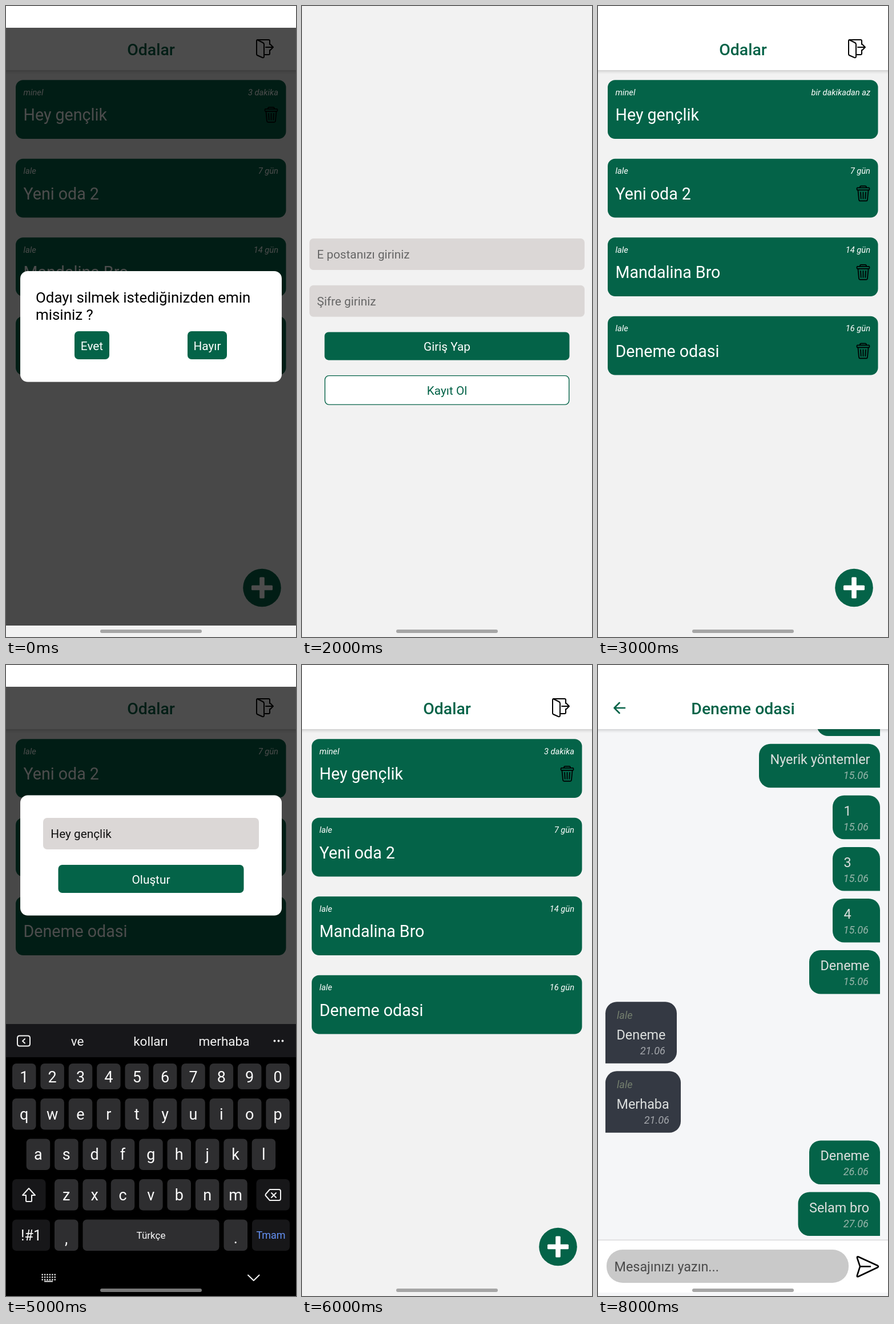
An HTML page that plays this animation: 508x1102 px, repeating every 9000 ms.

```html
<!DOCTYPE html>
<html lang="tr">
<head>
<meta charset="utf-8">
<style>
html, body { margin: 0; width: 100%; height: 100%; overflow: hidden; background: #f2f2f2; }
svg { display: block; width: 100vw; height: 100vh; font-family: Roboto, sans-serif; }
</style>
</head>
<body>
<svg id="stage" viewBox="0 0 508 1102"></svg>
<script>
const GREEN = '#046348', PAGE = '#f2f2f2', GRAY = '#dbd7d6';
const BODY = 20.8, CHAT = 23.4;

const rect = (x, y, w, h, fill, r = 0, extra = '') =>
  `<rect x="${x}" y="${y}" width="${w}" height="${h}" rx="${r}" fill="${fill}" ${extra}/>`;
const text = (x, y, size, fill, str, extra = '') =>
  `<text x="${x}" y="${y}" font-size="${size}" fill="${fill}" ${extra}>${str}</text>`;
const line = (d, color, width, extra = '') =>
  `<path d="${d}" fill="none" stroke="${color}" stroke-width="${width}" stroke-linejoin="round" stroke-linecap="round" ${extra}/>`;
const MID = 'text-anchor="middle"', END = 'text-anchor="end"', ITALIC = 'font-style="italic"';

const pill = (color = '#a6a6a6') => rect(165, 1089, 178, 6, color, 3);
const dim = (bottom = 1082) => rect(0, 38, 508, bottom - 38, 'rgba(0,0,0,.7)');

function header(title) {
  let shadow = '';
  for (let i = 0; i < 7; i++) shadow += rect(0, 112 + i, 508, 1, `rgba(0,0,0,${.13 * (1 - i / 7) ** 1.5})`);
  return shadow + rect(0, 0, 508, 112, '#fff') + text(254, 85.5, 28.4, GREEN, title, MID + ' font-weight="500"');
}

const door = line('M462 67V61q0-2-2-2H441q-2 0-2 2v23q0 1 1 2l9 4q3 1 3-2V67q0-2-2-3l-10-5M452 85h8q2 0 2-2v-6M455 72h12m-4-5l5 5-5 5', '#000', 2);

const trash = y => line(`M454.5 ${y + 4}h20q1 0 1 2t-1 2h-20q-1 0-1-2t1-2zM459 ${y + 4}v-1q0-2 2-2h7q2 0 2 2v1M455.5 ${y + 9}l1.5 16q.3 2 2 2h11q1.700 0 2-2l1.500-16M460 ${y + 12}l.7 11M464.500 ${y + 12}v11M469 ${y + 12}l-.7 11`, '#000', 1.7);

function card(i, [user, age, name, bin]) {
  const y = 129.3 + 137.5 * i;
  return rect(17, y, 473.5, 102.8, GREEN, 13)
    + text(30.5, y + 26.5, 14.7, '#fff', user, ITALIC)
    + text(477, y + 26.5, 14.7, '#fff', age, ITALIC + END.padStart(18))
    + text(30.5, y + 71, 28.6, '#fff', name)
    + (bin ? trash(y + 46.5) : '');
}

const list = cards => rect(0, 0, 508, 1102, PAGE) + header('Odalar') + door
  + cards.map((c, i) => card(i, c)).join('')
  + `<circle cx="448.5" cy="1016" r="33.3" fill="${GREEN}"/>`
  + rect(430, 1011.7, 37, 8.6, '#fff', 1.5) + rect(444.200, 997.5, 8.6, 37, '#fff', 1.5) + pill();

const field = (x, y, w, str, fill = '#666') => rect(x, y, w, 55, GRAY, 7) + text(x + 13.3, y + 35.3, BODY, fill, str);
const button = (x, y, w, str) => rect(x, y, w, 49, GREEN, 7) + text(x + w / 2, y + 33, BODY, '#fff', str, MID);
const outlined = (y, str) => rect(40.2, y + .7, 427.600, 50.5, '#fff', 7, `stroke="${GREEN}" stroke-width="1.400"`)
  + text(254, y + 33.7, BODY, GREEN, str, MID);

// Centred form: fields, main button, outlined button
function form(y, fields, main, other) {
  const end = y + 81.7 * fields.length;
  return rect(0, 0, 508, 1102, PAGE)
    + fields.map((f, i) => field(13, y + 81.7 * i, 482, f)).join('')
    + button(39.5, end, 429, main) + outlined(end + 75.5, other) + pill();
}

function banner() {
  let s = rect(0, 0, 508, 76, '#f0ad4e') + text(26.5, 48, BODY, '#fff', 'Lütfen tüm alanları doldurunuz')
    + text(28.5, 31, 19.7, '#fff', '23:40', 'font-weight="700"')
    + line('M88 20v-2q0-2 2-2h2M99 16h2q2 0 2 2v2M103 28v2q0 2-2 2h-2M92 32h-2q-2 0-2-2v-2', '#fff', 1.8)
    + rect(91, 19.500, 9.5, 9, '#fff', 2) + line('M92.500 27l2.500-3 2 2 1-1 1.500 2', '#f0ad4e', 1.2)
    + '<path d="M377 20.500h4l6-4.500v16l-6-4.500h-4z" fill="#fff"/>'
    + line('M378 16l13 15M390 18v4M390 26v2', '#fff', 1.6)
    + line('M400 21q8-7 16 0M402.500 24.500q5.500-5 11 0M405.500 28q2.500-2 5 0M414 30v-4m3 0v4', '#fff', 1.800)
    + '<circle cx="408" cy="30" r="1.500" fill="#fff"/>';
  for (let i = 0; i < 4; i++) s += rect(423 + 3.6 * i, 27 - 3.4 * i, 2, 4 + 3.4 * i, '#fff', 1, `opacity="${i < 2 ? 1 : .5}"`);
  return s + rect(443, 14, 36, 20, '#f7d8a8', 10)
    + '<path d="M453 14h12v20h-12a10 10 0 0 1 0-20z" fill="#fff"/>'
    + '<path d="M451 17l-5 8h3l-1 6 5.500-8h-3z" fill="#f0ad4e"/>'
    + text(465.500, 30, 17, '#f0ad4e', '58', MID + ' font-weight="700"');
}

const modal = (y, h) => rect(25, y, 458, h, '#fff', 13);
const createBox = (y, str, fill) => modal(y, 210) + field(65, y + 39.5, 378, str, fill) + button(91.5, y + 121.5, 325, 'Oluştur');
const confirmBox = modal(463, 193.5)
  + text(52, 517.5, 25.9, '#000', 'Odayı silmek istediğinizden emin') + text(52, 547.5, 25.9, '#000', 'misiniz ?')
  + button(120, 568, 61, 'Evet') + button(318, 568, 69, 'Hayır');

function keyboard() {
  const KEY = '#2e2e30', SIDE = '#171719', PITCH = 49.37;
  const cap = (x, y, w, h, label, base, size = 27, fill = KEY, color = '#fafafa') =>
    rect(x, y, w, h, fill, 7) + text(x + w / 2, y + base, size, color, label, MID);
  const row = (x, y, h, base, keys) => [...keys].map((k, i) => cap(x + PITCH * i, y, 41.5, h, k, base)).join('');
  let s = rect(0, 627, 508, 475, '#000') + rect(0, 627, 508, 58, '#17171a')
    + line('M24 647.500h14q4 0 4 4v10q0 4-4 4h-14q-4 0-4-4v-10q0-4 4-4zM33 653l-4 3.700 4 3.700', '#f2f2f2', 2);
  [['ve', 125], ['kolları', 253.5], ['merhaba', 382]].forEach(([w, x]) => s += text(x, 665, 22.5, '#f2f2f2', w, MID));
  for (const x of [470.5, 477.5, 484.5]) s += `<circle cx="${x}" cy="656.500" r="1.900" fill="#f2f2f2"/>`;
  s += row(11, 696, 45, 32.5, '1234567890') + row(11, 757, 54.500, 36.5, 'qwertyuıop'.replace('ı', 'i'))
    + row(35.7, 827.500, 54.500, 36.5, 'asdfghjkl') + row(85, 898, 54.500, 36.5, 'zxcvbnm')
    + rect(11, 898, 58.5, 54.5, SIDE, 7) + rect(438.500, 898, 58.5, 54.5, SIDE, 7)
    + line('M40 914l11 12h-6v10q0 1-1 1h-8q-1 0-1-1v-10h-6z', '#f2f2f2', 2)
    + line('M462 916h16q3 0 3 3v13q0 3-3 3h-16l-7-8q-1-1.500 0-3zM465 922l8 8m0-8l-8 8', '#f2f2f2', 2)
    + cap(11, 968.500, 66, 54.5, '!#1', 36, 25, SIDE) + cap(85, 968.500, 41.5, 54.5, ',', 42)
    + cap(134.5, 968.500, 239, 54.5, 'Türkçe', 33.5, 17) + cap(381.500, 968.500, 41.5, 54.5, '.', 41)
    + cap(431, 968.500, 66, 54.5, 'Tmam', 33.5, 18, SIDE, '#6592f5');
  for (let r = 0; r < 3; r++) for (let c = 0; c < 6; c++) s += rect(62.5 + 4.4 * c, 1063.500 + 4.4 * r, 2.4, 2.4, '#e8e8e8');
  return s + rect(67, 1075.500, 15, 2, '#e8e8e8') + line('M424 1065.500l9.800 9.500 9.800-9.500', '#f2f2f2', 2) + pill('#777');
}

// Mine: [x, label, date]; theirs add a sender and count x from the right edge
const chatLog = [
  [383, '', ''], [282, 'Nyerik yöntemler', '15.06'], [411, '1', '15.06'], [411, '3', '15.06'],
  [411, '4', '15.06'], [370, 'Deneme', '15.06'], [138, 'Deneme', '21.06', 'lale'],
  [145, 'Merhaba', '21.06', 'lale'], [370, 'Deneme', '26.06'], [350.5, 'Selam bro', '27.06']
];

function bubble([x, label, date, sender], y) {
  const x0 = sender ? 13 : x, x1 = sender ? x : 494, h = sender ? 107.500 : 76.500, R = 20;
  const tail = sender
    ? `V${y + h - R}a20 20 0 0 1-20 20H${x0}`
    : `V${y + h}H${x0 + R}a20 20 0 0 1-20-20`;
  return `<path d="M${x0} ${y + R}a20 20 0 0 1 20-20H${x1 - R}a20 20 0 0 1 20 20${tail}z" fill="${sender ? '#343943' : GREEN}"/>`
    + (sender ? text(33, y + 30, 18.2, '#75806f', sender, ITALIC) : '')
    + text(x0 + 19.5, y + h - 41.500, CHAT, '#dcdfde', label)
    + text(x1 - 20, y + h - 15.5, 18.2, sender ? '#a3a6ab' : '#97b5aa', date, `${ITALIC} ${END}`);
}

function chat(log, lift, draft) {
  let y = 997 - lift, s = '';
  for (const m of [...log].reverse()) {
    y -= m[3] ? 107.500 : 76.500;
    s += bubble(m, y);
    y -= 13.600;
  }
  const bar = rect(0, 1004, 508, 92, '#fff') + rect(0, 1003.5, 508, 1.600, '#dcdcde')
    + rect(15, 1021, 424, 58, '#c9c9c9', 28)
    + text(28.5, 1059, CHAT, draft ? '#111' : '#4a4a4a', draft || 'Mesajınızı yazın...')
    + line('M456 1033.500l34 15.500q2 1.500 0 3l-34 16q-3 1-2-2l5-15.500-5-15q-.500-3 2-2zM459 1050.500h18', '#000', 2.6);
  return rect(0, 0, 508, 1102, '#f5f6f8') + s + header('Deneme odasi')
    + line('M47 75H28.500m9-9l-9 9 9 9', GREEN, 2.6)
    + `<g transform="translate(0 ${-lift})">${bar}</g>` + pill();
}

const room = (age, name, bin) => ['lale', age, name, bin];
const rooms = bin => [room('7 gün', 'Yeni oda 2', bin), room('14 gün', 'Mandalina Bro', bin), room('16 gün', 'Deneme odasi', bin)];
const fresh = (age, bin) => ['minel', age, 'Hey gençlik', bin];
const recent = list([fresh('3 dakika', true), ...rooms(false)]);
const older = list(rooms(false));

const scenes = [
  recent + dim() + confirmBox,
  form(365, ['E postanızı giriniz', 'Şifre giriniz', 'Tekrar şifrenizi giriniz'], 'Kayıt Ol', 'Giriş Yap') + banner(),
  form(406, ['E postanızı giriniz', 'Şifre giriniz'], 'Giriş Yap', 'Kayıt Ol'),
  list([fresh('bir dakikadan az', false), ...rooms(true)]),
  older + dim() + createBox(455, 'Oda adı giriniz'),
  older + dim(627) + createBox(227.500, 'Hey gençlik', '#111') + keyboard(),
  recent,
  chat(chatLog.slice(0, -1), 469, 'Selam bro') + keyboard(),
  chat(chatLog, 0)
];

const stage = document.getElementById('stage'), start = performance.now();
let shown = -1;
function tick() {
  const i = Math.floor((performance.now() - start) / 1000) % scenes.length;
  if (i !== shown) stage.innerHTML = scenes[shown = i];
  requestAnimationFrame(tick);
}
tick();
</script>
</body>
</html>
```
